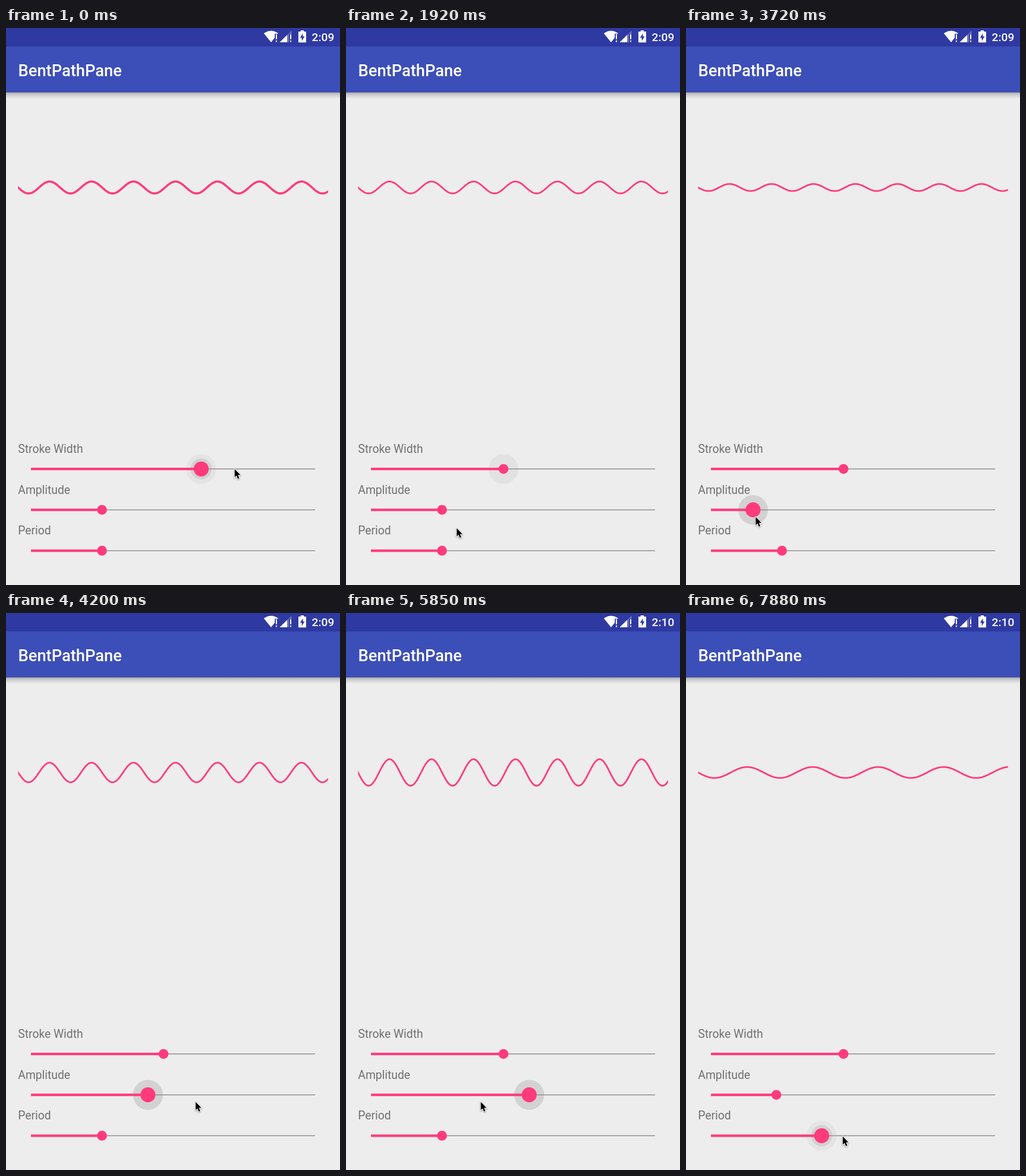
An HTML page with a canvas that plays this animation: 562 px wide and 936 px high, repeating every 8 s.

```html
<!DOCTYPE html>
<html lang="en">
<head>
<meta charset="utf-8">
<title>Wave sliders</title>
<style>
html, body { margin: 0; width: 100%; height: 100%; overflow: hidden; background: #ededed; }
canvas { display: block; width: 562px; height: 936px; }
</style>
</head>
<body>
<canvas id="stage" width="562" height="936"></canvas>
<script>
const ctx = document.getElementById('stage').getContext('2d');
const LOOP = 8000, PINK = '#ff3b7d', PAPER = '#ededed', BAR = '#2f39a2';
const LEFT = 42, SPAN = 478, MID = 268, EDGE = 20.3;
const LAG = 150; // thumbs trail the pointer

// Turning points of the pointer: time, x, y.
const hand = [
  [-500, 250, 740], [300, 444, 741], [1120, 265, 745], [1650, 265, 745],
  [1920, 186, 840], [2150, 186, 840], [2650, 161.5, 812], [3086, 131.5, 814],
  [3647, 112, 821], [4579, 432, 821], [5376, 415, 821], [6115, 152, 821],
  [6640, 152, 821], [6820, 155, 880], [6950, 161.5, 884], [7170, 140, 903],
  [8265, 310, 870]
];

// Each thumb follows the pointer from grab to drop; the halo runs from press to release.
const sliders = [
  { label: 'Stroke Width', grab: -500, drop: 1120, press: -530, release: 1650 },
  { label: 'Amplitude', grab: 2650, drop: 6115, press: 2985, release: 6640 },
  { label: 'Period', grab: 6950, drop: 8265, press: 7350, release: Infinity }
];

const clamp = (v, lo = 0, hi = 1) => Math.max(lo, Math.min(hi, v));
const ease = u => 0.5 - 0.5 * Math.cos(Math.PI * u);

function handAt(t) {
  const i = hand.findIndex(k => k[0] > t);
  if (i < 0) return hand[hand.length - 1].slice(1);
  if (i === 0) return hand[0].slice(1);
  const [t0, x0, y0] = hand[i - 1], [t1, x1, y1] = hand[i];
  const k = ease((t - t0) / (t1 - t0));
  return [x0 + (x1 - x0) * k, y0 + (y1 - y0) * k];
}

const thumbAt = (s, t) => handAt(clamp(t - LAG, s.grab, s.drop))[0];

function shape(points, color) {
  ctx.beginPath();
  points.forEach(([x, y]) => ctx.lineTo(x, y));
  ctx.closePath();
  ctx.fillStyle = color;
  ctx.fill();
}

function rect(x, y, w, h, color) {
  ctx.fillStyle = color;
  ctx.fillRect(x, y, w, h);
}

function disc(x, y, r, color) {
  ctx.beginPath();
  ctx.arc(x, y, r, 0, Math.PI * 2);
  ctx.fillStyle = color;
  ctx.fill();
}

function text(str, x, y, font, color) {
  ctx.font = font + ' Roboto, sans-serif';
  ctx.fillStyle = color;
  ctx.fillText(str, x, y);
}

// Exclamation mark in a notch cut out of an icon.
function alertMark(x) {
  rect(x - 2.8, 9.6, 6, 15, BAR);
  rect(x - 1, 10.5, 2, 8.5, '#fff');
  rect(x - 1, 21, 2, 2.5, '#fff');
}

function statusBar(t) {
  rect(0, 0, 562, 31, BAR);

  ctx.beginPath();
  ctx.moveTo(446, 24);
  ctx.lineTo(433.8, 9);
  ctx.quadraticCurveTo(446, 0.5, 458.2, 9);
  ctx.fillStyle = '#fff';
  ctx.fill();
  alertMark(455);

  shape([[460.5, 24], [480.5, 4.5], [480.5, 24]], 'rgba(255,255,255,.3)');
  shape([[460.5, 24], [473, 11.8], [473, 24]], '#fff');
  alertMark(479);

  rect(495.8, 4, 5.4, 3, '#fff');
  rect(492, 6, 13, 18.3, '#fff');
  shape([[499.5, 9], [494.7, 16.4], [497.7, 16.4], [497.7, 21.8], [502.5, 14.3], [499.5, 14.3]], BAR);

  text(t < 4500 ? '2:09' : '2:10', 514.5, 22, '500 19.2px', '#fff');
}

function appBar() {
  const shade = ctx.createLinearGradient(0, 108, 0, 119);
  shade.addColorStop(0, 'rgba(0,0,0,.28)');
  shade.addColorStop(0.4, 'rgba(0,0,0,.13)');
  shade.addColorStop(1, 'rgba(0,0,0,0)');
  rect(0, 108, 562, 11, shade);
  rect(0, 31, 562, 77.3, '#3c4eb8');
  text('BentPathPane', 20.5, 80.5, '500 27.3px', '#fff');
}

function wave(stroke, amp, period) {
  ctx.save();
  ctx.beginPath();
  ctx.rect(EDGE, 120, 521.5, 400);
  ctx.clip();
  ctx.beginPath();
  for (let x = 16; x <= 546; x++) {
    ctx.lineTo(x, MID + amp * Math.sin((x - EDGE) / period * Math.PI * 2));
  }
  ctx.lineWidth = stroke;
  ctx.lineJoin = 'round';
  ctx.strokeStyle = PINK;
  ctx.stroke();
  ctx.restore();
}

function slider(s, i, x, t) {
  const y = 741 + 68.7 * i;
  const held = t - s.press, gone = t - s.release;
  text(s.label, EDGE, y - 27, '19.3px', '#707070');

  if (held > 0 && gone < 450) {
    const fade = 1 - clamp(gone / 450);
    disc(x, y, 25.2, `rgba(0,0,0,${0.04 * fade * clamp((held - 70) / 250)})`);
    disc(x, y, 25.2 * clamp(held / 750), `rgba(0,0,0,${0.08 * fade})`);
  }
  rect(LEFT, y - 0.7, SPAN, 1.4, '#8b8b8b');
  rect(LEFT, y - 2.1, x - LEFT, 4.2, PINK);
  disc(x, y, 8.3 + 4.3 * clamp(held / 60) * (1 - clamp(gone / 210)), PINK);
}

function cursor(x, y) {
  ctx.save();
  ctx.translate(x, y);
  ctx.beginPath();
  [[0.3, 0.5], [0.3, 14.3], [3.4, 11.4], [5.6, 16.7], [8, 15.7], [5.8, 10.5], [10, 10.4]]
    .forEach(p => ctx.lineTo(...p));
  ctx.closePath();
  ctx.lineJoin = 'round';
  ctx.lineWidth = 2;
  ctx.strokeStyle = '#fff';
  ctx.shadowColor = 'rgba(0,0,0,.4)';
  ctx.shadowBlur = 2.5;
  ctx.shadowOffsetY = 1;
  ctx.stroke();
  ctx.shadowColor = 'transparent';
  ctx.fillStyle = '#000';
  ctx.fill();
  ctx.restore();
}

function draw(t) {
  rect(0, 0, 562, 936, PAPER);
  appBar();
  statusBar(t);
  const xs = sliders.map(s => thumbAt(s, t));
  const [stroke, amp, period] = xs.map(x => (x - LEFT) / SPAN);
  wave(stroke * 6, amp * 40, period * 282.6);
  sliders.forEach((s, i) => slider(s, i, xs[i], t));
  cursor(...handAt(t));
}

const start = performance.now();
function tick() {
  draw((performance.now() - start) % LOOP);
  requestAnimationFrame(tick);
}
tick();
</script>
</body>
</html>
```
